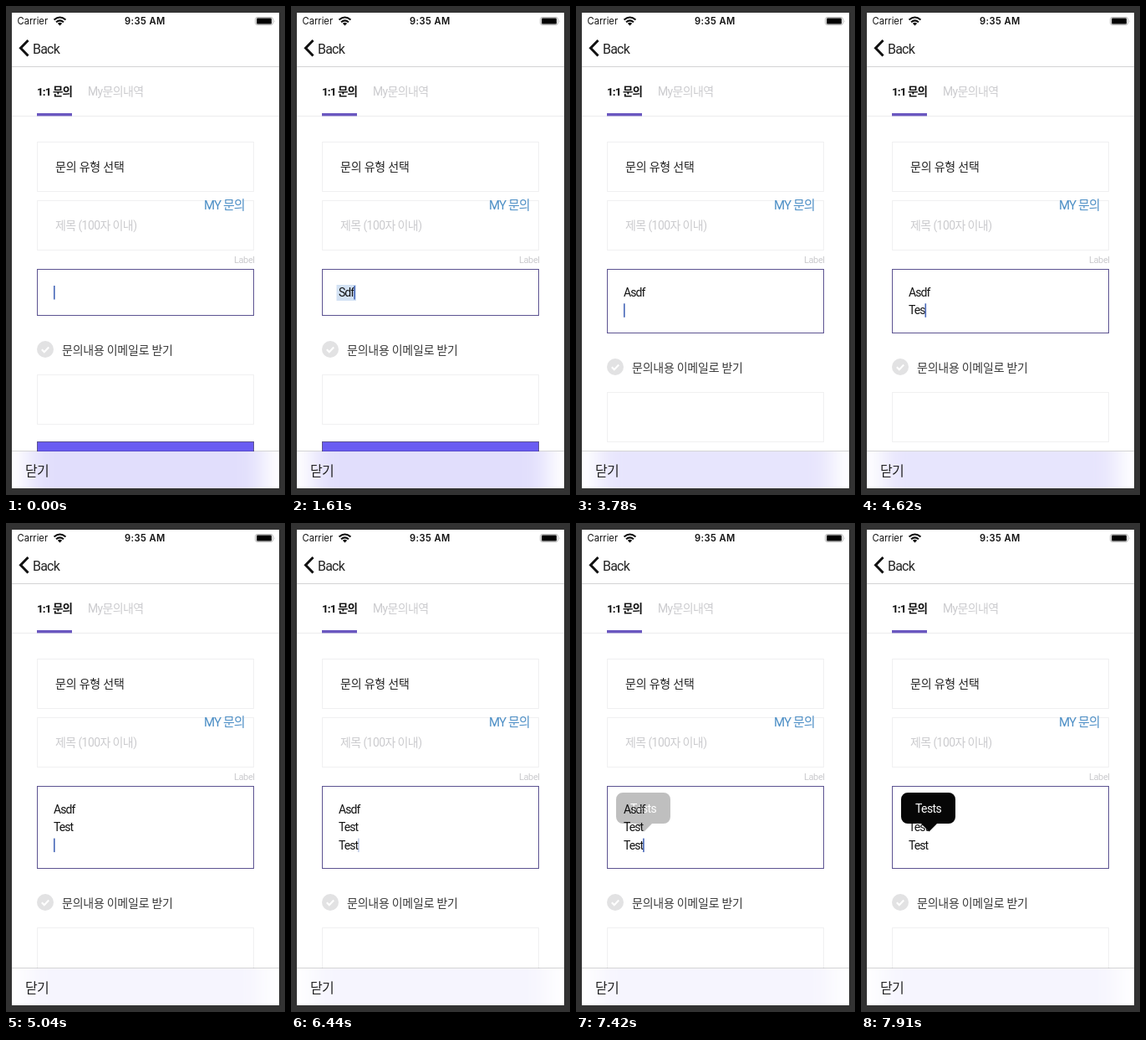
Write an HTML page that moves like this. It is 334 by 584 pixels and loops after 8000 ms.

```html
<!DOCTYPE html>
<html lang="ko">
<head>
<meta charset="utf-8">
<title>Inquiry form</title>
<style>
html, body { margin: 0; width: 100%; height: 100%; overflow: hidden; background: #323232; }
svg { display: block; width: 334px; height: 584px; }
text { font-family: Roboto, "Noto Sans CJK KR", "Noto Sans CJK", sans-serif; font-size: 14px; fill: #222; white-space: pre; }
.status { font-family: Inter, "Liberation Sans", sans-serif; font-size: 11.2px; fill: #111; }
.field { fill: #fff; stroke: #f0f0f1; }
.typed { font-size: 14px; letter-spacing: -.95px; fill: #111; }
.pale { fill: #cbcbce; }
</style>
</head>
<body>
<svg viewBox="0 0 334 584">
  <defs>
    <clipPath id="page"><rect x="7" y="8" width="320" height="524"/></clipPath>
    <clipPath id="dock"><rect x="7" y="532" width="320" height="44"/></clipPath>
    <filter id="blur" filterUnits="userSpaceOnUse" x="-40" y="420" width="420" height="300">
      <feGaussianBlur stdDeviation="14"/>
    </filter>
  </defs>
  <rect width="334" height="584" fill="#323232"/>
  <rect x="7" y="8" width="320" height="568" fill="#fff"/>

  <!-- status bar -->
  <text class="status" x="13.500" y="22">Carrier</text>
  <g fill="none" stroke="#111" stroke-width="2">
    <path d="M57.500 16.500Q64.500 10.500 71.500 16.500"/>
    <path d="M60 19.300Q64.500 15.500 69 19.300"/>
  </g>
  <path d="M61.800 20.800Q64.500 18.700 67.200 20.800L64.500 23.500Z" fill="#111"/>
  <text class="status" x="142" y="22" font-weight="600" letter-spacing=".4">9:35 AM</text>
  <rect x="298.500" y="13.500" width="21" height="9" rx="2.500" fill="none" stroke="#b4b4b4"/>
  <rect x="300" y="14.500" width="18" height="7" rx="1.300" fill="#000"/>
  <path d="M321.300 16.500v3.500q1.300-1.750 0-3.500" fill="#b4b4b4"/>

  <!-- navigation and tabs -->
  <path d="M26.500 41L17.500 50.200L26.500 59.500" fill="none" stroke="#111" stroke-width="3"/>
  <text x="32" y="57" style="font-size:16px;letter-spacing:-.8px">Back</text>
  <path d="M7 72.500H327" stroke="#d3d3d5"/>
  <text x="37" y="107" font-weight="700" style="font-size:13.5px;letter-spacing:-.9px;fill:#111">1:1 문의</text>
  <text class="pale" x="98" y="107" letter-spacing="-.65">My문의내역</text>
  <path d="M7 131.500H327" stroke="#ececee"/>
  <rect x="37" y="128" width="42" height="3.400" fill="#6a57c0"/>

  <g clip-path="url(#page)">
    <rect class="field" x="37.500" y="162.500" width="259" height="59"/>
    <text x="59" y="197" letter-spacing="-.2">문의 유형 선택</text>
    <rect class="field" x="37.500" y="232.500" width="259" height="59"/>
    <text class="pale" x="59" y="267" letter-spacing="-.6">제목 (100자 이내)</text>
    <text x="237" y="243" style="font-size:15px;letter-spacing:-.9px;fill:#4d8fc6">MY 문의</text>
    <text class="pale" x="273" y="307" style="font-size:11px;letter-spacing:-.4px">Label</text>

    <rect id="area" x="37.500" y="314.500" width="259" height="55" fill="#fff" stroke="#5c5391"/>
    <rect id="mark" x="54.500" y="333" width="23.500" height="19" fill="#d3e2f4"/>
    <text class="typed" x="57" y="347"></text>
    <text class="typed" x="57" y="368.300"></text>
    <text class="typed" x="57" y="389.600"></text>
    <rect id="caret" width="1.600" height="16.500" fill="#4767b8"/>

    <g id="below">
      <circle cx="47" cy="410" r="10" fill="#e2e2e3"/>
      <path d="M42.800 410.300l3 3l5.400-5.800" fill="none" stroke="#fff" stroke-width="2"/>
      <text x="67" y="415.500" letter-spacing="-.25" style="fill:#3a3a3a">문의내용 이메일로 받기</text>
      <rect class="field" x="37.500" y="440.500" width="259" height="59"/>
      <rect x="37.500" y="520.500" width="259" height="60" fill="#6a5cf2" stroke="#5c5391"/>
    </g>

    <g id="bubble">
      <path d="M56 322H105a8 8 0 0 1 8 8V351a8 8 0 0 1-8 8H91L81.500 368.500L72 359H56a8 8 0 0 1-8-8V330a8 8 0 0 1 8-8Z" fill="#060606"/>
      <text x="65" y="346" style="letter-spacing:-.6px;fill:#fff">Tests</text>
    </g>
  </g>

  <!-- frosted bottom bar -->
  <g clip-path="url(#dock)">
    <rect x="7" y="532" width="320" height="44" fill="#fff"/>
    <rect id="glow" x="27" y="480" width="280" height="150" fill="#6a5cf2" filter="url(#blur)"/>
    <rect x="7" y="532" width="320" height="44" fill="#fff" opacity=".8"/>
  </g>
  <path d="M7 531.500H327" stroke="#000" stroke-opacity=".17"/>
  <text x="23" y="560.500" style="font-size:16px;letter-spacing:-.6px">닫기</text>
</svg>
<script>
const LOOP = 8000, STEP = 70, LINE = 21.3;
const $ = id => document.getElementById(id);
const rows = [...document.querySelectorAll('.typed')];

// [time, text in the box from then on]
const typing = [
  [0, ''], [980, 'S'], [1120, 'Sd'], [1260, 'Sdf'],
  [1820, 'Sd'], [1960, ''], [2100, 'A'], [2240, 'As'], [2380, 'Asd'], [2520, 'Asdf'],
  [3780, 'Asdf\n'], [4270, 'Asdf\nT'], [4410, 'Asdf\nTe'], [4550, 'Asdf\nTes'],
  [4690, 'Asdf\nTest'], [5040, 'Asdf\nTest\n'], [5460, 'Asdf\nTest\nT'],
  [5600, 'Asdf\nTest\nTe'], [5670, 'Asdf\nTest\nTes'], [5810, 'Asdf\nTest\nTest']
];
// [start, end, opacity at the end]
const blink = [
  [70, 280, 0], [700, 840, 1], [2870, 3080, 0], [3570, 3710, 1],
  [6300, 6510, 0], [7000, 7140, 1], [7700, 7910, 0]
];
const popup = [[7350, 7630, 1]];

function fade(list, t, value) {
  for (const [a, b, end] of list) {
    if (t <= a) break;
    value += (end - value) * Math.min(1, (t - a) / (b - a));
  }
  return value;
}

function draw(now) {
  const t = Math.min(Math.floor((now % LOOP) / STEP) * STEP, 7910);
  const lines = typing.filter(e => e[0] <= t).pop()[1].split('\n');
  const last = lines.length - 1, shift = Math.round(last * LINE);

  rows.forEach((row, i) => row.textContent = lines[i] || '');
  const width = lines[last] ? rows[last].getComputedTextLength() : 0;
  $('caret').setAttribute('x', 57 + width);
  $('caret').setAttribute('y', 334 + last * LINE);
  $('caret').setAttribute('opacity', fade(blink, t, 1));
  $('mark').setAttribute('opacity', t >= 1610 && t < 1680 ? 1 : 0);
  $('area').setAttribute('height', 55 + shift);
  $('below').setAttribute('transform', `translate(0 ${shift})`);
  // the bar's tint follows how much of it the button lies under
  $('glow').setAttribute('opacity', Math.min(1, (56 - shift) / 44));
  $('bubble').setAttribute('opacity', fade(popup, t, 0));
}

function tick() {
  draw(performance.now());
  requestAnimationFrame(tick);
}
tick();
</script>
</body>
</html>
```
